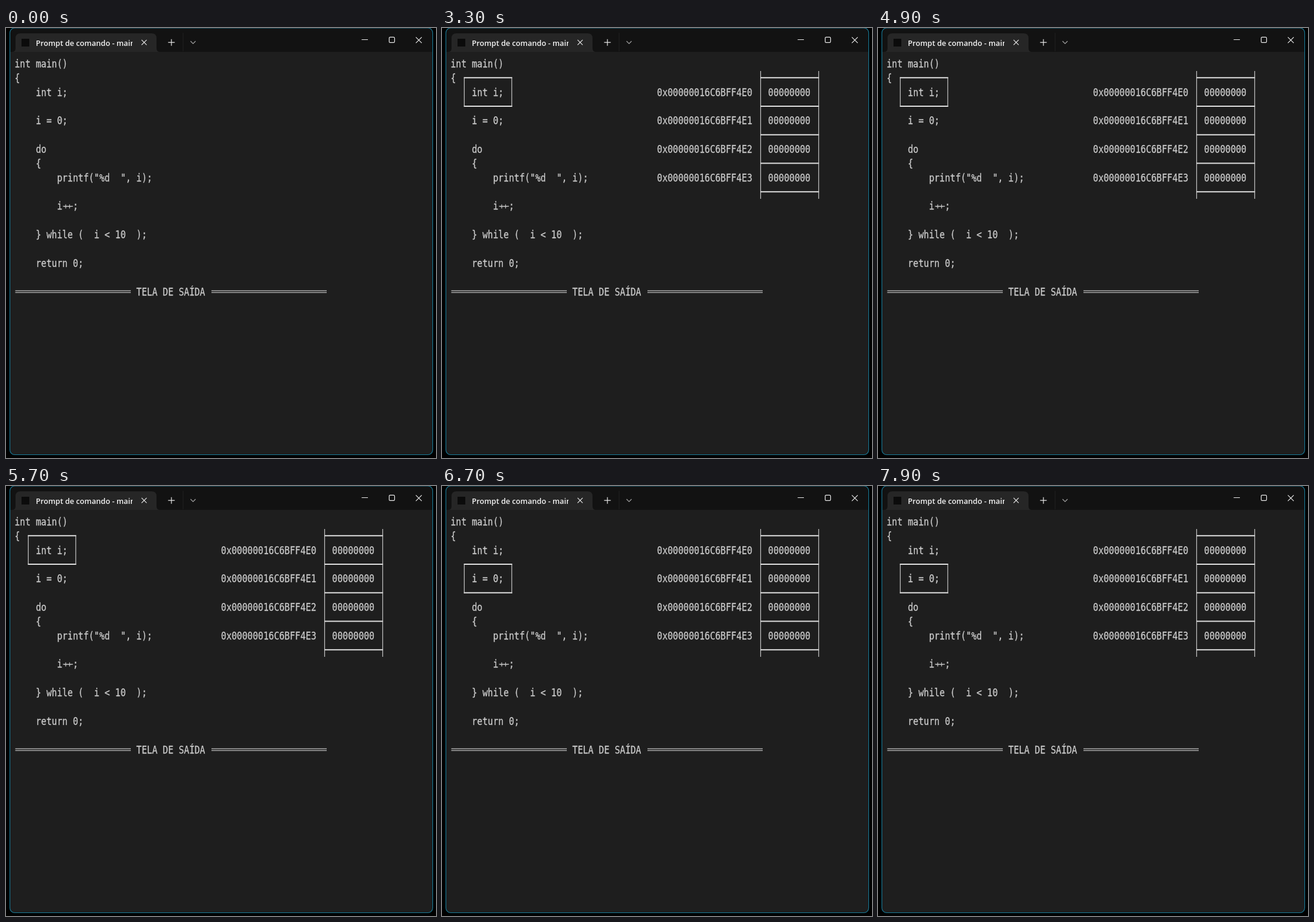
Recreate the animation shown at these times as an HTML page. Size 720 by 720 pixels, loop 8 s.

```html
<!DOCTYPE html>
<html lang="pt">
<head>
<meta charset="utf-8">
<title>Prompt de comando</title>
<style>
  html, body { margin: 0; width: 100%; height: 100%; overflow: hidden; background: #000; }
  svg { display: block; width: 100vw; height: 100vh; }
  text { white-space: pre; }
  .mono { font-family: "DejaVu Sans Mono", monospace; fill: #cbcbcb; stroke: #cbcbcb; stroke-width: .3; }
  .tab { font: 600 12.65px "Open Sans", "Noto Sans", sans-serif; fill: #f4f4f4; }
  .icon { fill: none; stroke: #e8e8e8; stroke-width: 1.2; }
</style>
</head>
<body>
<svg viewBox="0 0 720 720">
  <defs>
    <clipPath id="window"><rect x="6.5" y="0" width="708" height="714.5" rx="8"/></clipPath>
    <clipPath id="label"><rect x="48" y="10" width="164" height="30"/></clipPath>
  </defs>

  <g clip-path="url(#window)">
    <rect width="720" height="720" fill="#1e1e1e"/>
    <rect width="720" height="40" fill="#121212"/>
    <path d="M10 40Q16 40 16 34V17Q16 9 24 9H244Q252 9 252 17V34Q252 40 258 40Z" fill="#262626"/>
    <path d="M296.5 8V39" stroke="#202020"/>
  </g>
  <rect x="6.5" y="0" width="708" height="714.5" rx="8" fill="none" stroke="#187b98" stroke-width="1.1"/>

  <rect x="26" y="18" width="13" height="13" fill="#0b0b0b"/>
  <text class="tab" x="50" y="29.5" clip-path="url(#label)">Prompt de comando - main</text>
  <path class="icon" d="M227 19.8l8.5 8.5m0-8.5l-8.5 8.5M271.5 24.2h11m-5.5-5.5v11"/>
  <path class="icon" d="M309 22l4.2 4.2 4.2-4.2" style="stroke:#a0a0a0"/>
  <path class="icon" d="M595.5 19.5h10.5M686.3 15.3l9.8 9.8m0-9.8l-9.8 9.8"/>
  <rect class="icon" x="641.6" y="15.4" width="9" height="9" rx="1.6"/>

  <g id="code"></g>
  <g id="memory"></g>
  <g id="marker"></g>
</svg>
<script>
const NS = "http://www.w3.org/2000/svg";
const LOOP = 8000, DECLARE = 3300, ASSIGN = 6000;
const LEFT = 14.5, PITCH = 8.86, BASE = 65.8, LEAD = 23.86;
const SIZE = 17.8, NARROW = 0.827; // condensed cut shared by all terminal text

const code = document.getElementById("code");
const memory = document.getElementById("memory");
const marker = document.getElementById("marker");

function add(parent, tag, attrs) {
  const el = document.createElementNS(NS, tag);
  for (const name in attrs) el.setAttribute(name, attrs[name]);
  return parent.appendChild(el);
}

function write(parent, x, y, text, size = SIZE) {
  add(parent, "text", {
    class: "mono", "font-size": size,
    transform: `translate(${x} ${y}) scale(${NARROW} 1)`
  }).textContent = text;
}

function put(parent, col, row, text) {
  write(parent, LEFT + col * PITCH, BASE + row * LEAD, text);
}

function line(parent, d, width, color) {
  add(parent, "path", { d, "stroke-width": width, stroke: color, fill: "none" });
}

const rowsDown = (parent, x1, x2, ys) =>
  line(parent, ys.map(y => `M${x1} ${y}H${x2}`).join(""), 1.9, "#dedede");

const sides = (parent, x1, x2, top, bottom) =>
  line(parent, `M${x1} ${top}V${bottom}M${x2} ${top}V${bottom}`, 1.2, "#c8c8c8");

// Program listing: column, row, text
[
  [0, 0, "int main()"],
  [0, 1, "{"],
  [4, 2, "int i;"],
  [4, 4, "i = 0;"],
  [4, 6, "do"],
  [4, 7, "{"],
  [8, 8, 'printf("%d  ", i);'],
  [8, 10, "i"],
  [11, 10, ";"],
  [4, 12, "} while (  i < 10  );"],
  [4, 14, "return 0;"],
  [23, 16, "TELA DE SAÍDA"]
].forEach(item => put(code, ...item));

// Joined operators
write(code, 96.8, 302.6, "++", 13);
line(code, "M95.5 298.5H112", 1.3, "#cbcbcb");
for (const y of [439.8, 442.8]) line(code, `M15.5 ${y}H209M344 ${y}H537`, 1.3, "#c0c0c0");

// Four bytes of memory
for (let i = 0; i < 4; i++) {
  put(memory, 39, 2 + 2 * i, "0x00000016C6BFF4E" + i);
  put(memory, 60, 2 + 2 * i, "00000000");
}
sides(memory, 533.5, 630.7, 72, 286);
rowsDown(memory, 533, 631.2, [0, 1, 2, 3, 4].map(i => 83.3 + i * 47.75));

// Frame around the current statement
sides(marker, 37.3, 116.8, 82.5, 132);
rowsDown(marker, 36.7, 117.4, [83.3, 131.05]);

function draw(time) {
  const visible = time >= DECLARE ? "visible" : "hidden";
  memory.setAttribute("visibility", visible);
  marker.setAttribute("visibility", visible);
  marker.setAttribute("transform", `translate(0 ${time >= ASSIGN ? 47.75 : 0})`);
}

const start = performance.now();
function tick() {
  draw((performance.now() - start) % LOOP);
  requestAnimationFrame(tick);
}
tick();
</script>
</body>
</html>
```
